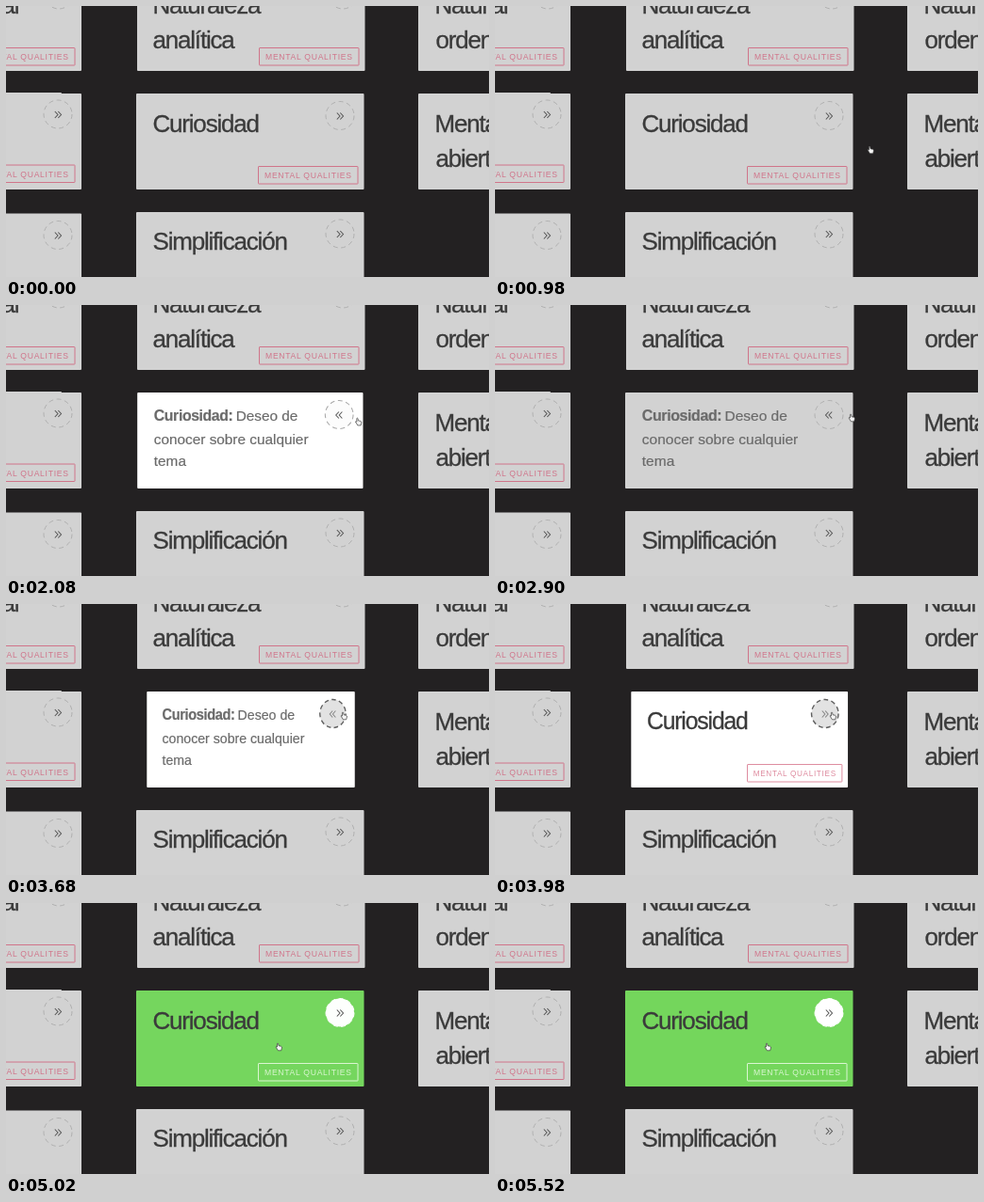
An HTML page that plays this animation: 512 by 288 pixels, repeating every 5.54 s.

```html
<!DOCTYPE html>
<html lang="es">
<head>
<meta charset="utf-8">
<title>Flip cards</title>
<style>
  html, body { margin: 0; width: 100%; height: 100%; overflow: hidden; background: #232122; }
  svg { display: block; width: 512px; height: 288px; font-family: "Liberation Sans", Arial, sans-serif; }
  .title { font-size: 26px; letter-spacing: -1.2px; fill: #3b3b3b; stroke: #3b3b3b; stroke-width: .3; }
  .tag rect { fill: none; stroke: #d0748a; stroke-width: 1; }
  .tag text { font-size: 8.6px; letter-spacing: .72px; fill: #d0748a; }
  .ring { fill: none; stroke: #b0b0b0; stroke-width: 1; stroke-dasharray: 5 3.6; }
  .arrow { fill: none; stroke: #585858; stroke-width: 1.1; }
  .note { font-size: 15.5px; fill: #6a6a6a; stroke: #6a6a6a; stroke-width: .2; }
  .note .term { font-size: 16px; font-weight: bold; letter-spacing: -.4px; }
</style>
</head>
<body>
<svg id="stage" viewBox="0 0 512 288"></svg>
<script>
const LOOP = 5540, FLIP = 600, PIVOT = 267.5;
const GRAY = [210, 210, 210], WHITE = [255, 255, 255], GREEN = [116, 214, 92];
const PINK = [208, 116, 138], PALE_PINK = [222, 138, 158], MINT = [218, 246, 210];

const panel = (x, y, w, h) =>
  `<rect class="panel" x="${x}" y="${y}" width="${w}" height="${h}" rx="1" fill="#d2d2d2"/>`;
const title = (x, y, text) => `<text class="title" x="${x}" y="${y}">${text}</text>`;
const tag = (x, y) => `<g class="tag"><rect x="${x + .5}" y="${y + .5}" width="105.5" height="18.5" rx=".5"/>
  <text x="${x + 7}" y="${y + 13.2}">MENTAL QUALITIES</text></g>`;
const badge = (x, y, dir = 1) => `<circle class="ring" cx="${x}" cy="${y}" r="15"/>
  <path class="arrow" transform="translate(${x} ${y + .5}) scale(${dir} 1)"
    d="M-3.2-3.5 0 0-3.2 3.5M.3-3.5 3.5 0 .3 3.5"/>`;

document.getElementById("stage").innerHTML = `
  <rect width="512" height="288" fill="#232122"/>
  ${panel(-20, -32, 100, 101)}${title(-4.5, 8, "al")}${badge(56, -12)}${tag(-33, 44)}
  ${panel(139, -32, 241.5, 101)}${title(155.5, 8, "Naturaleza")}${title(155.5, 45, "analítica")}
  ${badge(357, -12)}${tag(268, 44)}
  ${panel(437, -32, 242, 101)}${title(454.5, 8, "Naturaleza")}${title(455.5, 45, "ordenada")}
  ${panel(-20, 92, 79, 4)}${panel(-20, 93, 100, 102)}${badge(55, 115)}${tag(-33, 168.5)}
  ${panel(437, 93, 242, 102)}${title(454.5, 133.5, "Mentalidad")}${title(455.5, 171, "abierta")}
  ${panel(-20, 220.5, 100, 101)}${badge(55, 243.5)}
  ${panel(138, 219, 241.5, 101)}${title(155.5, 259, "Simplificación")}${badge(354, 242)}
  <g id="front">
    ${panel(138, 93, 241.5, 102)}${title(155.5, 133.5, "Curiosidad")}${badge(354, 116.5)}${tag(267, 170)}
  </g>
  <g id="back">
    ${panel(138, 93, 241.5, 102)}
    <g class="note">
      <text class="term" x="155.8" y="123">Curiosidad:</text>
      <text x="243.5" y="123">Deseo de</text>
      <text x="155.8" y="148">conocer sobre cualquier</text>
      <text x="155.8" y="171">tema</text>
    </g>
    ${badge(354, 116.5, -1)}
  </g>
  <path id="hand" fill="#f4f4f4" stroke="#3a3a3a" stroke-width=".7" stroke-linejoin="round"
    d="M-1.6-3.6Q-1-4.4-.4-3.6L0-1.3 2.6-.7Q3.6-.3 3.4 1L2.7 3.8H-.6L-3-.1Q-2.8-1-1.5-.1Z"/>`;

// Each row: time, then values reached at that time.
const hoverKeys = [[1160, 0], [1300, 1], [2120, 1], [2260, 0], [2940, 0], [3080, 1]];
const ringKeys = [[1380, 0], [1480, 1], [2000, 1], [2100, 0], [3300, 0], [3400, 1], [4050, 1], [4150, 0]];
const greenKeys = [[4880, 0], [5030, 1]];
const handKeys = [
  [620, 520, 185], [960, 398, 153], [1080, 398, 153], [1450, 360, 122], [1950, 360, 122],
  [2200, 385, 126], [2500, 392, 128], [2650, 392, 128], [2900, 378, 120], [3350, 358, 119],
  [4050, 358, 119], [4450, 289, 153]
];

const clamp = v => Math.min(1, Math.max(0, v));
const lerp = (a, b, p) => a + (b - a) * p;
const mix = (a, b, p) => a.map((v, i) => lerp(v, b[i], p));
const rgb = c => `rgb(${c.map(Math.round).join()})`;

function track(keys, t) {
  const next = keys.findIndex(k => k[0] > t);
  if (next === 0) return keys[0].slice(1);
  if (next < 0) return keys[keys.length - 1].slice(1);
  const a = keys[next - 1], b = keys[next];
  const p = (t - a[0]) / (b[0] - a[0]);
  return mix(a.slice(1), b.slice(1), p * p * (3 - 2 * p));
}

// CSS "ease", solved by bisection.
function ease(x) {
  let lo = 0, hi = 1;
  for (let i = 0; i < 24; i++) {
    const u = (lo + hi) / 2;
    if (.75 * u * (1 - u) + u ** 3 < x) lo = u; else hi = u;
  }
  return .3 * lo * (1 - lo) ** 2 + 3 * lo * lo * (1 - lo) + lo ** 3;
}

const turn = (t, start) => ease(clamp((t - start) / FLIP));
const parts = id => {
  const root = document.getElementById(id), find = s => root.querySelector(s);
  return { root, panel: find(".panel"), ring: find(".ring"), arrow: find(".arrow"),
    box: find(".tag rect"), label: find(".tag text") };
};
const faces = [parts("front"), parts("back")];
const hand = document.getElementById("hand");

function draw(t) {
  const [hover] = track(hoverKeys, t), [over] = track(ringKeys, t), [green] = track(greenKeys, t);
  const side = Math.cos(Math.PI * (turn(t, 1637) - turn(t, 3607)));
  const fill = rgb(mix(mix(GRAY, WHITE, hover), GREEN, green));
  const ink = rgb(mix(mix(PINK, PALE_PINK, hover), MINT, green));

  faces.forEach((f, i) => {
    const s = i ? -side : side;
    f.root.style.display = s > 0 ? "" : "none";
    f.root.setAttribute("transform", `translate(${PIVOT * (1 - s)} 0) scale(${Math.max(s, .001)} 1)`);
    f.panel.style.fill = fill;
    f.ring.style.fill = green ? rgb(WHITE) : "#e2e2e2";
    f.ring.style.fillOpacity = Math.max(over, green);
    f.ring.style.stroke = rgb(mix(mix([176, 176, 176], [95, 95, 95], over), WHITE, green));
    f.ring.style.strokeWidth = 1 + .5 * over;
    f.arrow.style.stroke = rgb(mix([88, 88, 88], [132, 132, 132], over));
    if (f.box) {
      f.box.style.stroke = ink;
      f.label.style.fill = ink;
    }
  });

  const [x, y] = track(handKeys, t);
  hand.setAttribute("transform", `translate(${x} ${y})`);
}

const origin = performance.now();
function tick() {
  draw((performance.now() - origin) % LOOP);
  requestAnimationFrame(tick);
}
tick();
</script>
</body>
</html>
```
